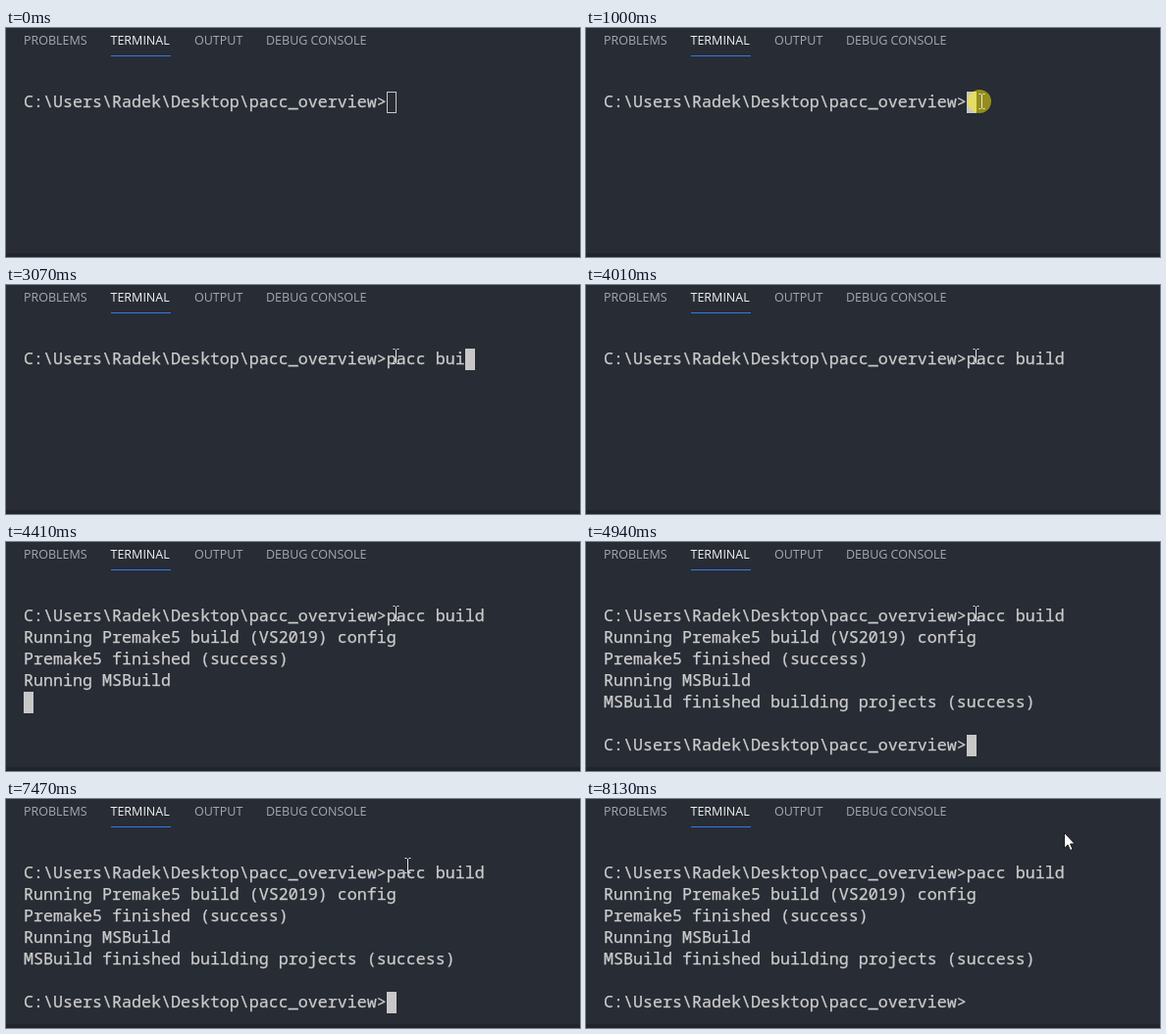
Recreate the animation shown at these times as an HTML page. Size 585 px wide and 234 px high, loop 8460 ms.

```html
<!DOCTYPE html>
<html lang="en">
<head>
<meta charset="utf-8">
<title>Terminal build</title>
<style>
  html, body { margin: 0; width: 100%; height: 100%; overflow: hidden; background: #282c34; }
  svg { display: block; width: 585px; height: 234px; }
  .tab { font: 12.5px "Open Sans", "Noto Sans", sans-serif; fill: #a6a9ae; }
  .tab.active { fill: #f2f3f4; }
  .row {
    font: 500 16.667px "Noto Sans Mono", "DejaVu Sans Mono", monospace;
    fill: #cccccc; stroke: #cccccc; stroke-width: .25; white-space: pre;
  }
</style>
</head>
<body>
<svg viewBox="0 0 585 234">
  <rect width="585" height="234" fill="#282c34"/>
  <rect y="230" width="585" height="4" fill="#21252b"/>
  <text class="tab" x="18" y="17">PROBLEMS</text>
  <text class="tab active" x="106.5" y="17">TERMINAL</text>
  <text class="tab" x="192" y="17">OUTPUT</text>
  <text class="tab" x="265" y="17">DEBUG CONSOLE</text>
  <rect x="107" y="28" width="61" height="1" fill="#3279e8"/>
  <g id="rows"></g>
  <rect id="block" width="10" height="22" fill="#c8c8c8"/>
  <rect id="outline" x="388.5" y="65.5" width="9" height="21" fill="none" stroke="#c8c8c8"/>
  <circle id="click" cx="401" cy="75" r="12" fill="#fff000" opacity=".5"/>
  <path id="beam" d="M-3 -7.5H-1M1 -7.5H3M0 -7V7M-3 7.5H-1M1 7.5H3" fill="none" stroke="#e6e6e6"/>
  <path id="arrow" d="M.5 .5V16.2L4.1 12.8L6.6 18.4L9 17.4L6.6 11.9H11.2Z"
        fill="#fff" stroke="#111" stroke-width=".9"/>
</svg>
<script>
const LOOP = 8460, LEFT = 18, TOP = 65, CELL = 10, LINE = 22;
const PROMPT = "C:\\Users\\Radek\\Desktop\\pacc_overview>";
const COMMAND = "pacc build";
const FOCUS = 1000;
const keyTimes = [2070, 2130, 2200, 2340, 2530, 2730, 2870, 3070, 3270, 3410];
const output = [
  [4280, "Running Premake5 build (VS2019) config"],
  [4410, "Premake5 finished (success)"],
  [4410, "Running MSBuild"],
  [4940, "MSBuild finished building projects (success)"],
  [4940, ""],
  [4940, PROMPT],
];

// Pointer waypoints: time, x, y
const entry = [[530, 511, 1], [1000, 403, 75], [1333, 396, 75], [1400, 397, 73]];
const exit = [[7267, 397, 73], [8133, 487, 34]];

const $ = id => document.getElementById(id);
const show = (el, on) => el.setAttribute("visibility", on ? "visible" : "hidden");
const place = (el, x, y) => el.setAttribute("transform", `translate(${x} ${y})`);

const rows = Array.from({ length: 7 }, (_, i) => {
  const text = document.createElementNS("http://www.w3.org/2000/svg", "text");
  text.setAttribute("class", "row");
  text.setAttribute("x", LEFT);
  text.setAttribute("y", TOP + 16 + i * LINE);
  return $("rows").appendChild(text);
});

function along(path, t) {
  const i = path.findIndex(p => p[0] > t);
  if (i < 0) return path[path.length - 1].slice(1);
  if (i === 0) return path[0].slice(1);
  const [t0, x0, y0] = path[i - 1], [t1, x1, y1] = path[i];
  const u = (t - t0) / (t1 - t0), e = u * u * (3 - 2 * u);
  return [Math.round(x0 + (x1 - x0) * e), Math.round(y0 + (y1 - y0) * e)];
}

function drawPointer(t) {
  const step = Math.floor((t + 4) * 0.015) / 0.015; // moves at 15 steps a second
  const [x, y] = along(t < 5000 ? entry : exit, step);
  const visible = t >= 530, overHeader = y < 42;
  place($("arrow"), x, y);
  place($("beam"), x + 0.5, y);
  show($("arrow"), visible && overHeader);
  show($("beam"), visible && !overHeader);
  show($("click"), t >= FOCUS && t < 1130);
}

function drawTerminal(t) {
  const typed = keyTimes.filter(k => k <= t).length;
  const printed = output.filter(([time]) => time <= t);
  const lines = [PROMPT + COMMAND.slice(0, typed), ...printed.map(([, text]) => text)];
  rows.forEach((row, i) => {
    const text = lines[i] || "";
    if (row.textContent !== text) row.textContent = text;
  });

  const done = printed.length === output.length;
  const waiting = printed.length > 0 && !done;
  const column = waiting ? 0 : lines[lines.length - 1].length;
  const line = waiting ? lines.length : lines.length - 1;
  const events = [FOCUS, ...keyTimes, ...output.map(([time]) => time)];
  const last = Math.max(...events.filter(time => time <= t));
  const lit = Math.floor((t - last + 10) / 600) % 2 === 0;
  place($("block"), LEFT + column * CELL, TOP + line * LINE);
  show($("block"), t >= FOCUS && lit);
  show($("outline"), t < FOCUS);
}

function draw(t) {
  drawTerminal(t);
  drawPointer(t);
}

const start = performance.now();
function tick() {
  draw((performance.now() - start) % LOOP);
  requestAnimationFrame(tick);
}
tick();
</script>
</body>
</html>
```
